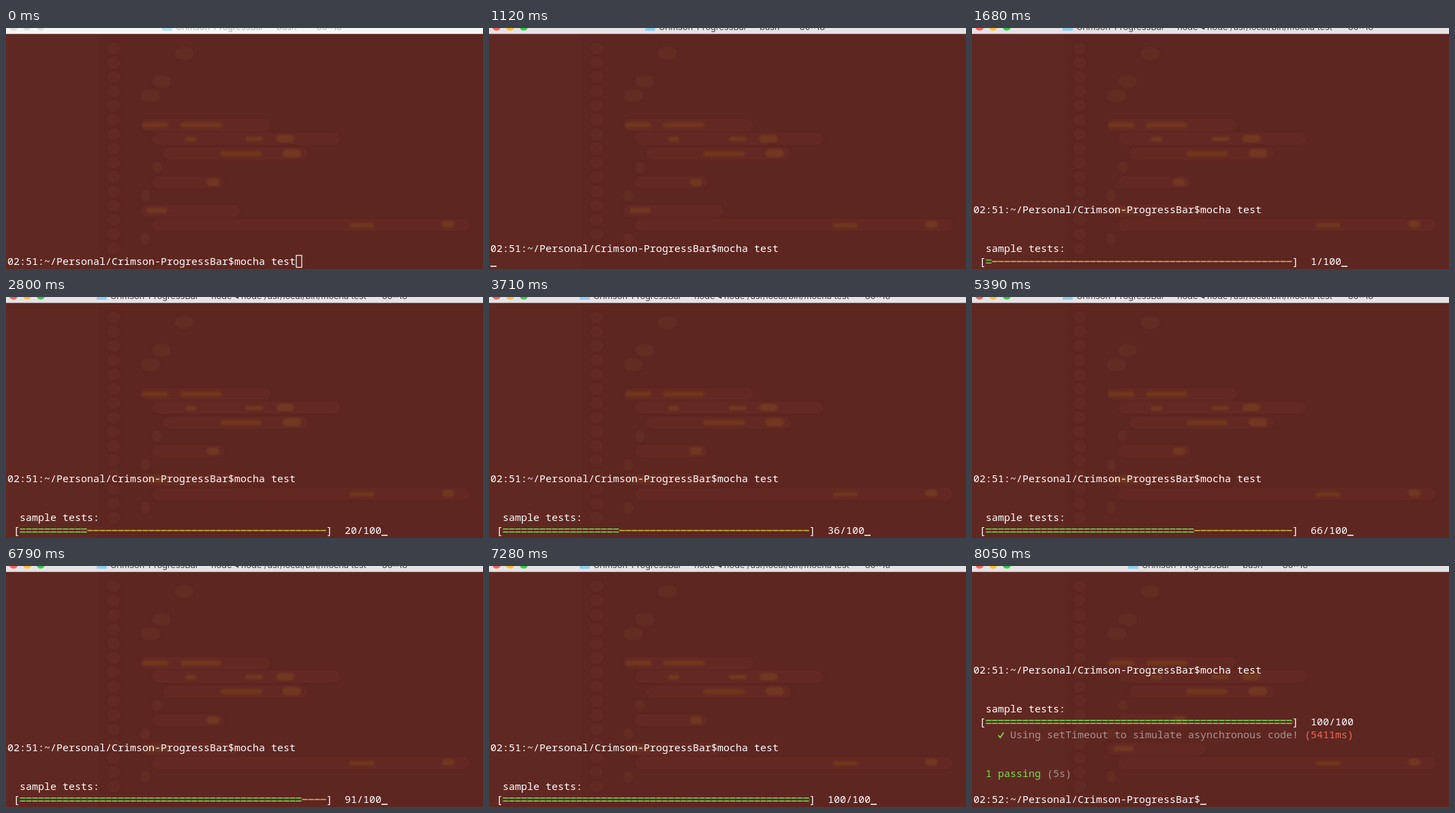
Write an HTML page that moves like this. It is 700 by 354 pixels and loops after 8120 ms.

```html
<!DOCTYPE html>
<html lang="en">
<head>
<meta charset="utf-8">
<title>Terminal progress bar</title>
<style>
  html, body { margin: 0; width: 100%; height: 100%; overflow: hidden; background: #5e2621; }
  svg { display: block; width: 700px; height: 354px; }
  .mono { font: 500 15px "Noto Sans Mono", "DejaVu Sans Mono", monospace; fill: #fff; }
  .title { font: 12.7px Inter, "Liberation Sans", sans-serif; }
</style>
</head>
<body>
<svg id="stage" viewBox="0 0 700 354" xmlns="http://www.w3.org/2000/svg">
  <defs>
    <filter id="soft" x="-5%" y="-5%" width="110%" height="110%"><feGaussianBlur stdDeviation="1.8"/></filter>
    <clipPath id="screen"><rect y="9" width="700" height="345"/></clipPath>
  </defs>
  <rect width="700" height="354" fill="#5e2621"/>
  <rect width="136" height="354" fill="#602822"/>
  <g id="ghost" filter="url(#soft)"></g>
  <g clip-path="url(#screen)"><g id="term" class="mono"></g></g>
  <g id="bar"></g>
</svg>
<script>
const LOOP = 8120, STEP = 70, CELL = 9, ROW = 19, BASE = 348;
const GREEN = '#74e34c', YELLOW = '#d2c432', GREY = '#a59492', RED = '#ee6a4f';
const $ = id => document.getElementById(id);
const col = c => 2 + c * CELL;

function add(parent, tag, attrs, text) {
  const el = document.createElementNS('http://www.w3.org/2000/svg', tag);
  set(el, attrs);
  if (text) el.textContent = text;
  return parent.appendChild(el);
}
function set(el, attrs) {
  for (const k in attrs) el.setAttribute(k, attrs[k]);
}
function show(el, on) {
  el.setAttribute('visibility', on ? 'visible' : 'hidden');
}

// Faint editor showing through the window
const ghost = $('ghost');
const blob = (x, y, w, h, fill, opacity) =>
  add(ghost, 'rect', { x, y, width: w, height: h, rx: Math.min(w, h) / 2, fill, opacity });
for (let y = 22; y < 320; y += 21) blob(149, y, 18, 16, '#692f28', 0.4);
[[248, 29, 27], [215, 70, 27], [198, 91, 28], [198, 134, 190], [215, 154, 275],
 [231, 176, 212], [215, 196, 13], [215, 218, 105], [198, 238, 13], [198, 260, 145],
 [215, 281, 465], [198, 301, 13]].forEach(([x, y, w]) => blob(x, y, w, 17, '#6b3029', 0.45));
[[200, 139, 38, 7], [256, 139, 60, 7], [263, 160, 16, 7], [352, 160, 25, 6],
 [397, 157, 26, 11], [315, 181, 60, 7], [406, 178, 27, 12], [295, 221, 18, 11],
 [207, 264, 30, 8], [505, 287, 35, 6], [640, 283, 18, 10]]
  .forEach(([x, y, w, h]) => blob(x, y, w, h, '#7d431b', 0.55));

// Terminal text, laid out in rows below the first prompt
const term = $('term');
const say = (parent, c, row, text, fill = '#fff') =>
  add(parent, 'text', { x: col(c), y: BASE + row * ROW, fill }, text);
const PATH = ':~/Personal/Crimson-ProgressBar$';

say(term, 0, 0, '02:51' + PATH + 'mocha test');
const heading = say(term, 2, 3, 'sample tests:');

const progress = add(term, 'g', {});
const midY = BASE + 4 * ROW - 5;
const rule = (y, stroke) => add(progress, 'line', {
  y1: y, y2: y, stroke, 'stroke-width': 1.4, 'stroke-dasharray': '8.2 .8'
});
say(progress, 1, 4, '[');
say(progress, 52, 4, ']');
const done = [rule(midY - 2.2, GREEN), rule(midY + 2.2, GREEN)];
const left = rule(midY, YELLOW);
const count = say(progress, 55, 4, '1/100');

const result = add(term, 'g', {});
add(result, 'path', {
  d: `M38.5 ${BASE + 5 * ROW - 4.5}l3 3.5 5-7.5`, fill: 'none', stroke: GREEN, 'stroke-width': 1.8
});
say(result, 6, 5, 'Using setTimeout to simulate asynchronous code!', GREY);
say(result, 54, 5, '(5411ms)', RED);
say(result, 2, 8, '1 passing', GREEN);
say(result, 12, 8, '(5s)', GREY);
say(result, 0, 10, '02:52' + PATH);

const boxCursor = add($('stage'), 'rect', {
  x: 426, y: 334, width: 8, height: 17.5, fill: 'none', stroke: '#fff', 'stroke-width': 1.2
});
const lineCursor = add($('stage'), 'rect', { y: 349.3, width: 9, height: 1.5, fill: '#fff' });

// Title bar
const bar = $('bar');
const back = add(bar, 'rect', { width: 700, height: 8.7 });
const lights = [11, 31, 51].map(cx => add(bar, 'circle', { cx, cy: -2.5, r: 6.3 }));
const folder = add(bar, 'rect', { y: -6, width: 15, height: 10, rx: 1 });
const title = add(bar, 'g', { class: 'title' });
const label = text => add(title, 'text', { y: 3 }, text);
const name = label('Crimson-ProgressBar'), job = label(''), size = label('80×18');
size.setAttribute('text-anchor', 'end');

function drawTitle(active, running) {
  back.setAttribute('fill', active ? '#e5e3e5' : '#f6f6f6');
  const colors = active ? ['#fb5f57', '#fcbd2e', '#35c94a'] : ['#dcdcdc', '#dcdcdc', '#dcdcdc'];
  lights.forEach((dot, i) => dot.setAttribute('fill', colors[i]));
  const x = running ? 153 : 249;
  set(folder, { x: x - 20, fill: active ? '#8fcdec' : '#b5e2f7' });
  title.setAttribute('fill', active ? '#454345' : '#b3b3b3');
  name.setAttribute('x', x);
  job.setAttribute('x', x + 132);
  job.textContent = running ? '— node ◂ node /usr/local/bin/mocha test —' : '— bash —';
  size.setAttribute('x', running ? 589 : 493);
}

function draw(time) {
  const t = Math.floor((time % LOOP) / STEP) * STEP;
  const focused = t >= 840, entered = t >= 980, started = t >= 1610;
  const ticking = t >= 1650, finished = t >= 7350;
  const n = Math.max(1, Math.min(100, Math.floor((t - 1659) / 56)));

  const scroll = finished ? 10 : started ? 4 : entered ? 1 : 0;
  term.setAttribute('transform', `translate(0 ${-scroll * ROW})`);
  show(heading, started);
  show(progress, ticking);
  show(result, finished);

  const split = col(2 + Math.min(50, Math.floor(n / 2) + 1));
  done.forEach(line => set(line, { x1: col(2) + 0.4, x2: split }));
  set(left, { x1: split + 0.4, x2: col(52) });
  count.textContent = n + '/100';

  const at = finished ? 37 : ticking ? 55 + count.textContent.length : entered ? 0 : 47;
  show(boxCursor, !focused);
  show(lineCursor, focused);
  lineCursor.setAttribute('x', col(at));
  drawTitle(focused, t >= 1470 && !finished);
}

const begin = performance.now();
function tick() {
  draw(performance.now() - begin);
  requestAnimationFrame(tick);
}
tick();
</script>
</body>
</html>
```
